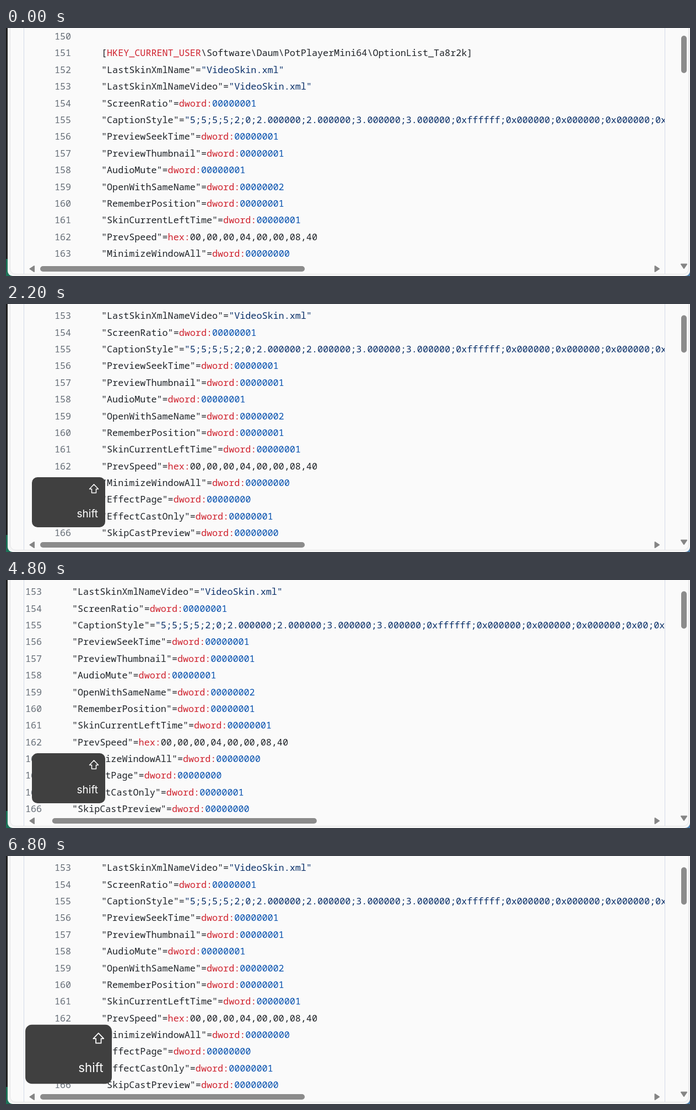
An HTML page for the animation above (7 s loop, 1241x451 px).

```html
<!DOCTYPE html>
<html lang="en">
<head>
<meta charset="utf-8">
<title>Scrolling a registry file</title>
<style>
html, body { margin: 0; width: 100%; height: 100%; overflow: hidden; }
body { position: relative; background: linear-gradient(90deg, #222 50%, #4b7ca8 50%); }
div, svg { position: absolute; box-sizing: border-box; }
#desk { left: 0; top: 420px; width: 20px; height: 31px; background: #1d7358; }
#win { left: 3px; top: -20px; width: 1238px; height: 471px; border-radius: 0 0 9px 9px; background: #f6f6f6; }
#panel { left: 7px; top: -20px; width: 1232px; height: 468px; border: 1px solid #e3e3e5; border-radius: 10px; background: #fafafa; }
#view { left: 32px; top: -1px; width: 1164px; height: 448px; border: 1px solid #d3d9e8; border-bottom: 0; }
#clip { left: 33px; top: 0; width: 1162px; height: 429px; overflow: hidden; }
#code { left: 0; top: 0; font: 16.75px/30.4px "Noto Sans Mono", monospace; white-space: pre; color: #1f2328; }
#code div { position: relative; height: 30.4px; padding-left: 140px; }
#code i { position: absolute; left: 55px; font-style: normal; color: #656d76; }
.r { color: #cf222e; }
.n { color: #0550ae; }
.s { color: #0a3069; }
.thumb { border-radius: 6px; background: #8b8b8b; }
#vbar { left: 1224.5px; top: 14px; width: 10.5px; height: 68px; }
#hbar { left: 61.5px; top: 432.5px; width: 480.5px; height: 10.5px; }
#key { left: 47px; top: 315px; width: 132.5px; height: 91px; border-radius: 10px; background: #404040; color: #fff; }
#key span { position: absolute; right: 12.5px; top: 55px; font: 19px/24px Inter, sans-serif; }
#key svg { left: 103px; top: 10.5px; }
</style>
</head>
<body>
<div id="desk"></div>
<div id="win"></div>
<div id="panel"></div>
<div id="view"></div>
<div id="clip"><div id="code"></div></div>
<svg width="1241" height="451" fill="#858585" stroke="#858585" stroke-width="2" stroke-linejoin="round">
  <path d="M43.500 438l7.500-5v10zM1185 438l-7.500-5v10zM1225 429.500h10l-5 7.500z"/>
</svg>
<div id="vbar" class="thumb"></div>
<div id="hbar" class="thumb"></div>
<div id="key">
  <svg width="19" height="20" fill="none" stroke="#fff" stroke-width="1.5" stroke-linejoin="round">
    <path d="M9.500 2L17.500 10.500H13.500V17.500H5.500V10.500H1.500Z"/>
  </svg>
  <span>shift</span>
</div>
<script>
const $ = id => document.getElementById(id);
const paint = (cls, text) => `<span class="${cls}">${text}</span>`;

const tail = '0xffffff;0x000000;0x000000;0x000000;0x00;0x00;0x00;0x90;1;Times New Roman;18.000000;100.000000';
const caption = '5;5;5;5;2;0;2.000000;2.000000;3.000000;3.000000;' + tail +
  ';100.000000;0.000000;0;0;1;' + tail.slice(0, 62);

// A number is a dword, "hex:" is raw bytes, anything else is a string.
const entries = [
  ['LastSkinXmlName', 'VideoSkin.xml'],
  ['LastSkinXmlNameVideo', 'VideoSkin.xml'],
  ['ScreenRatio', 1],
  ['CaptionStyle', caption],
  ['PreviewSeekTime', 1],
  ['PreviewThumbnail', 1],
  ['AudioMute', 1],
  ['OpenWithSameName', 2],
  ['RememberPosition', 1],
  ['SkinCurrentLeftTime', 1],
  ['PrevSpeed', 'hex:00,00,00,04,00,00,08,40'],
  ['MinimizeWindowAll', 0],
  ['EffectPage', 0],
  ['EffectCastOnly', 1],
  ['SkipCastPreview', 0],
  ['ChatAttachToMain2', 0],
  ['BroadcastAttachToMain2', 0],
  ['SortByFolderPL', 1],
  ['SortByNamePL', 0],
  ['PlaylistAttach', 1],
  ['RepeatPlay', 0]
];

function value(v) {
  if (typeof v === 'number') return paint('r', 'dword:') + paint('n', String(v).padStart(8, '0'));
  if (v.startsWith('hex:')) return paint('r', 'hex:') + v.slice(4);
  return paint('s', `"${v}"`);
}

const lines = [
  '',
  '[' + paint('r', 'HKEY_CURRENT_USER') + '\\Software\\Daum\\PotPlayerMini64\\OptionList_Ta8r2k]',
  ...entries.map(([name, v]) => `"${name}"=${value(v)}`)
];
$('code').innerHTML = lines.map((line, i) => `<div><i>${150 + i}</i>${line}</div>`).join('');

// Linear track through [time, value] points, held at both ends.
function track(points, t) {
  const i = points.findIndex(p => p[0] > t);
  if (i < 0) return points[points.length - 1][1];
  if (i === 0) return points[0][1];
  const [t0, a] = points[i - 1], [t1, b] = points[i];
  return a + (b - a) * (t - t0) / (t1 - t0);
}

const scrollY = [[800, 0], [1000, 165], [1200, 250], [1400, 215], [1600, 130], [1800, 85]];
const scrollX = [[2400, 0], [2600, 70], [3200, 556], [3800, 1331], [4800, 53], [5500, 1150], [6000, 532], [6600, 0]];

function draw(now) {
  const t = Math.floor(now % 7000 / 200) * 200;
  const x = track(scrollX, t), y = track(scrollY, t);
  $('code').style.transform = `translate(${-Math.round(x)}px, ${-y}px)`;
  $('hbar').style.transform = `translateX(${x * 0.412}px)`;
  $('vbar').style.transform = `translateY(${y * 0.077}px)`;
  $('key').style.visibility = t >= 2200 ? 'visible' : 'hidden';
  $('key').style.transform = `scale(${t >= 6800 ? 1.18 : 1})`;
  requestAnimationFrame(draw);
}
draw(0);
</script>
</body>
</html>
```
